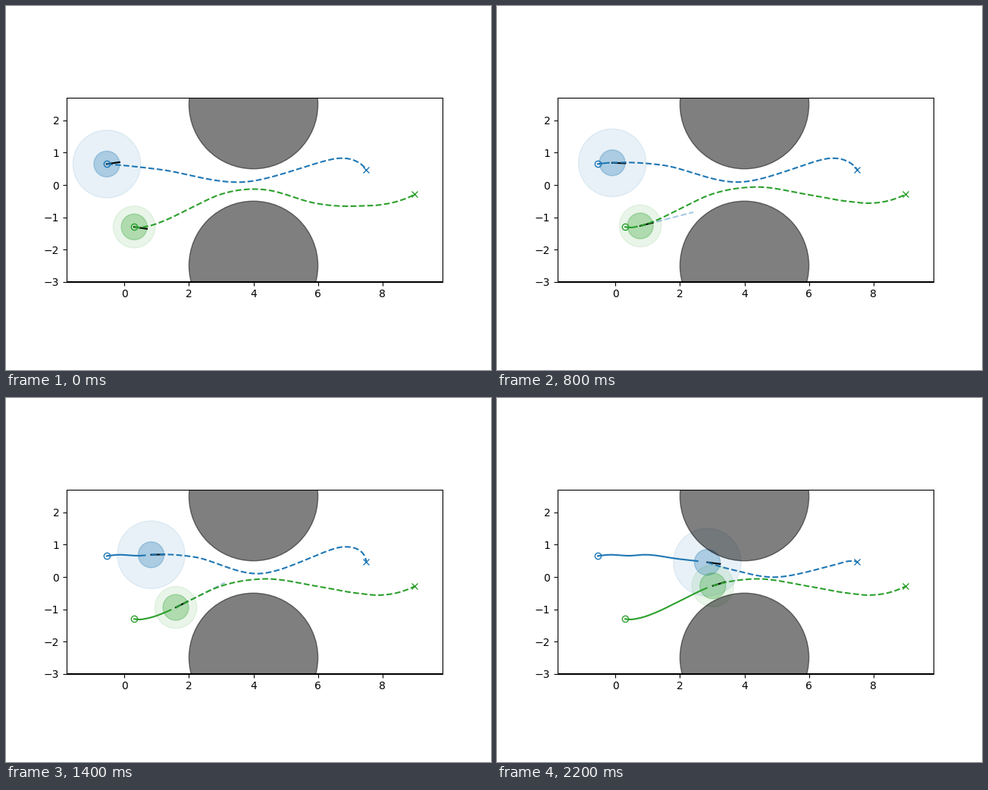
A matplotlib script for the animation above (2300 ms loop, 640 by 480 pixels).

```python
import numpy as np
import matplotlib.pyplot as plt
from matplotlib.animation import FuncAnimation
from matplotlib.patches import Circle

FRAMES, INTERVAL = 23, 100
RADIUS, LOOKAHEAD = 0.4, 1.7
BLUE_GOAL, GREEN_GOAL = (7.5, 0.47), (9.0, -0.29)

# Waypoints (x, y) of the two roads.
BLUE_ROAD = [(-0.55, 0.65), (-0.25, 0.685), (0.5, 0.66), (0.85, 0.69),
             (1.95, 0.56), (2.85, 0.455), (3.4, 0.38)]
GREEN_ROAD = [(0.3, -1.3), (0.4, -1.315), (0.76, -1.27), (1.3, -1.08),
              (1.92, -0.78), (3, -0.28), (4.3, -0.06), (6, -0.29),
              (7.2, -0.5), (7.95, -0.56), (8.5, -0.48), GREEN_GOAL]


def hermite(t, knots, pts):
    """Smooth curve through pts at the given knots."""
    t, knots, pts = (np.asarray(v, float) for v in (t, knots, pts))
    slope = np.gradient(pts, knots, axis=0, edge_order=2)
    i = np.clip(np.searchsorted(knots, t, side="right") - 1, 0, len(knots) - 2)
    h = (knots[i + 1] - knots[i])[:, None]
    u = (t - knots[i])[:, None] / h
    return ((1 + 2 * u) * (1 - u) ** 2 * pts[i] + u * (1 - u) ** 2 * h * slope[i]
            + u * u * (3 - 2 * u) * pts[i + 1] + u * u * (u - 1) * h * slope[i + 1])


def along(road, x):
    """Points of a road at the given x values."""
    return hermite(x, [p[0] for p in road], road)


def spline(pts, n=240):
    """Centripetal spline through free points."""
    pts = np.array(pts)
    knots = np.r_[0, np.cumsum(np.sqrt(np.hypot(*np.diff(pts, axis=0).T)))]
    return hermite(np.linspace(0, knots[-1], n), knots, pts)


def pulse(v, center, width):
    return np.exp(-((v - center) / width) ** 2)


def smoothstep(v):
    v = np.clip(v, 0, 1)
    return v * v * (3 - 2 * v)


def blue_plan(f, pos):
    """Over a shoulder, down through the gap, up a swell and on to the goal."""
    loop, hook = pulse(f, 16, 1.5), pulse(f, 19, 1.5)
    late = smoothstep((f - 19) / 3)
    valley = np.array([3.65 + 0.38 * (pos[0] - BLUE_ROAD[0][0]),
                       0.09 + 0.1 * pulse(f, 17.5, 2.5) - 0.1 * late])
    shoulder = 0.6 * pos + 0.4 * valley
    shoulder[1] += 0.05 + 0.24 * pulse(f, 11, 3.5) - 0.11 * late
    swell = (6.7 + 0.64 * loop, 0.83 + 0.62 * loop - 0.48 * late)
    tip = (7.22 + 0.62 * loop + 0.66 * hook,
           0.72 + 0.48 * loop - 0.55 * hook - 0.22 * late)
    return spline([pos, shoulder, valley, swell, tip, BLUE_GOAL])


def green_plan(f, pos):
    """The road itself, with a dip behind the gap that soon flattens out."""
    pts = along(GREEN_ROAD, np.linspace(pos[0], GREEN_GOAL[0], 240))
    pts[:, 1] -= 0.29 * np.exp(-f / 2.6) * pulse(pts[:, 0], 6, 1.5)
    return pts


class Agent:
    def __init__(self, ax, color, margin, road, goal, accel, drag, plan_rule):
        f = np.arange(FRAMES)
        x = road[0][0] + accel * f ** 2 - drag * f ** 3
        self.track = along(road, x)
        step = along(road, x + 0.1) - self.track
        self.heading = step / np.hypot(*step.T)[:, None]
        self.plan_rule = plan_rule
        self.discs = [ax.add_patch(Circle(road[0], r, color=color, alpha=a))
                      for r, a in ((margin, 0.1), (RADIUS, 0.3))]
        self.nose, = ax.plot([], [], color="black")
        self.past, = ax.plot([], [], color=color)
        self.plan, = ax.plot([], [], "--", color=color)
        ax.plot(*road[0], "o", color=color, fillstyle="none")
        ax.plot(*goal, "x", color=color)

    def ray(self, f, length):
        pos = self.track[f]
        return np.array([pos, pos + length * self.heading[f]]).T

    def update(self, f):
        pos = self.track[f]
        for disc in self.discs:
            disc.center = pos
        self.nose.set_data(*self.ray(f, RADIUS))
        past = self.track[:f] if f > 1 else self.track[[0, 0]]
        self.past.set_data(*past.T)
        self.plan.set_data(*self.plan_rule(f, pos).T)


fig, ax = plt.subplots(figsize=(6.4, 4.8), dpi=100)
ax.set_aspect("equal")
ax.set_xlim(-1.796, 9.865)
ax.set_ylim(-3, 2.7)
ax.set_xticks(range(0, 10, 2))
ax.set_yticks(range(-3, 3))
ax.axhline(-3, color="black")

forecast, = ax.plot([], [], "--", color="tab:blue", alpha=0.4)
blue = Agent(ax, "tab:blue", 1.05, BLUE_ROAD, BLUE_GOAL, 0.00702, 0, blue_plan)
green = Agent(ax, "tab:green", 0.65, GREEN_ROAD, GREEN_GOAL, 0.0083, 0.000122, green_plan)

# The obstacles shade the agents that pass beneath them.
for cy in (2.5, -2.5):
    ax.add_patch(Circle((4, cy), 2, color="black", alpha=0.5))


def update(f):
    blue.update(f)
    green.update(f)
    forecast.set_visible(0 < f < FRAMES - 1)
    forecast.set_data(*green.ray(f, LOOKAHEAD))


anim = FuncAnimation(fig, update, frames=FRAMES, init_func=lambda: update(0),
                     interval=INTERVAL, repeat=True, repeat_delay=0)
plt.show()
```
